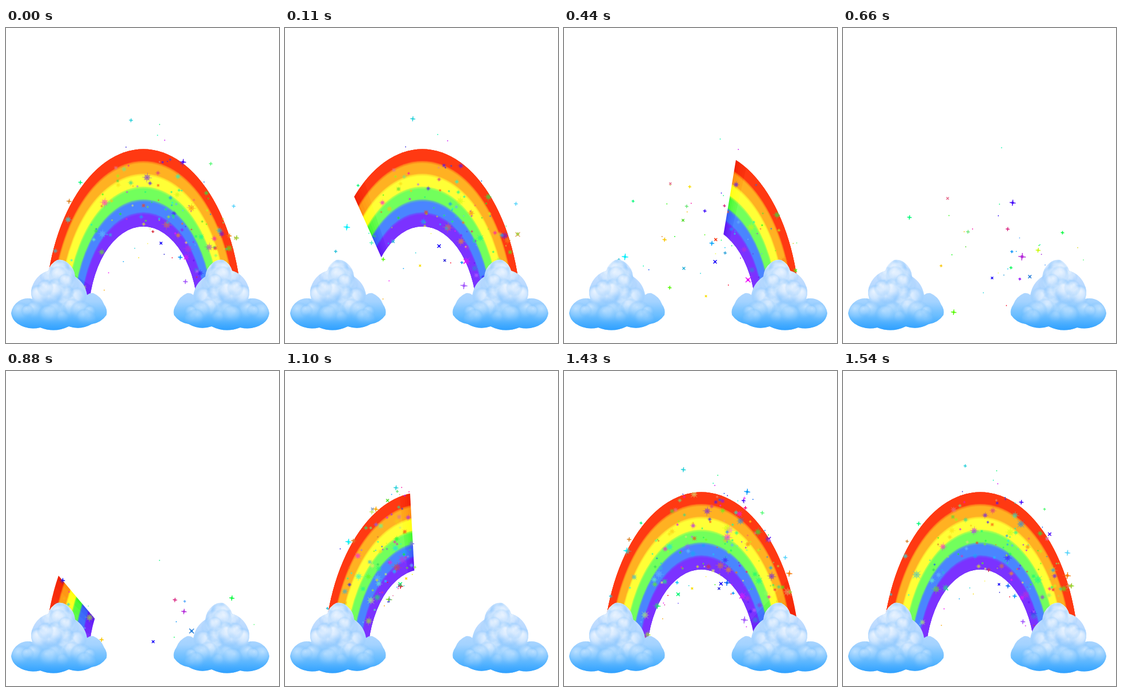
An HTML page with a canvas that plays this animation: 478x550 px, repeating every 1650 ms.

```html
<!DOCTYPE html>
<html lang="en">
<head>
<meta charset="utf-8">
<title>Rainbow</title>
<style>
  html, body { margin: 0; width: 100%; height: 100%; overflow: hidden; background: #fff; }
  canvas { display: block; }
</style>
</head>
<body>
<canvas id="stage" width="478" height="550"></canvas>
<script>
const W = 478, H = 550, STEP = 110, STEPS = 15;
const ctx = document.getElementById('stage').getContext('2d');

let seed = 77;
function random() {
  seed = (seed * 1664525 + 1013904223) >>> 0;
  return seed / 4294967296;
}
const between = (a, b) => a + (b - a) * random();
const clamp = (v, limit) => Math.max(-limit, Math.min(limit, v));

function layer(paint) {
  const canvas = document.createElement('canvas');
  canvas.width = W;
  canvas.height = H;
  paint(canvas.getContext('2d'));
  return canvas;
}

// ---- Rainbow: u runs from the outer edge (0) to the inner edge (1) ----
const CX = 240.5, DEPTH = 135, GROUND = 505;
const arc = u => ({ cy: 511 - 5 * u, a: 173 - 77 * u, b: 299.5 - 140 * u });

function arcPoint(n, u) {
  const { cy, a, b } = arc(u);
  n = clamp(n, 0.994);
  return [CX + a * n, cy - b * Math.sqrt(1 - n * n)];
}

function rainbow(colors) {
  return layer(c => {
    const disc = (top, alpha) => {
      const { cy, a, b } = arc(top / DEPTH);
      c.globalAlpha = alpha;
      c.beginPath();
      c.ellipse(CX, cy, a, b, 0, 0, 7);
      c.fill();
    };
    c.rect(0, 0, W, GROUND);
    c.clip();
    colors.forEach((color, i) => {
      const top = i * 22.4;
      c.fillStyle = color;
      if (i) for (let o = -2; o < 2; o++) disc(top + o, 0.35);
      disc(top + (i ? 2 : 0), 1);
    });
    c.globalCompositeOperation = 'destination-out';
    disc(DEPTH, 1);
  });
}

const bright = rainbow(['#ff3912', '#ffb122', '#ffff36', '#72ff5c', '#4a85ff', '#7b32ff']);
const deep = rainbow(['#f02004', '#ff8c10', '#ffff10', '#3cf52c', '#3555f5', '#5a14f2']);

// Shows the part of the arc on one side of a cut (side 1: left, -1: right).
function drawPart(image, x, side, alpha) {
  const n = (x - CX) / 173;
  const [ox, oy] = arcPoint(n, 0), [ix, iy] = arcPoint(n * (1.18 - 0.2 * n * n), 1);
  ctx.save();
  ctx.translate(ox, oy);
  ctx.rotate(Math.atan2(iy - oy, ix - ox));
  ctx.beginPath();
  ctx.rect(-900, 0, 1800, 900 * side);
  ctx.clip();
  ctx.setTransform(1, 0, 0, 1, 0, 0);
  ctx.globalAlpha = alpha;
  ctx.drawImage(image, 0, 0);
  ctx.restore();
}

const headX = t => 92 + 63.5 * (t - 8);
const tailX = t => 61 + 60 * t;

function drawRainbow(k) {
  const growing = k > 6, side = growing ? 1 : -1;
  const x = growing ? headX(k) : tailX(k);
  drawPart(deep, x, side, 1);
  for (let d = 2; d <= 18; d += 4) drawPart(bright, x - d * side, side, d < 18 ? 0.28 : 1);
}

// ---- Clouds: a few corners joined by outward bulges, filled with soft puffs ----
const corners = [
  [9, 498], [22, 477], [46, 473], [48, 446], [74, 424], [90, 405], [108, 410], [121, 434],
  [142, 466], [153, 463], [172, 483], [176, 501], [150, 517], [110, 521], [60, 523], [20, 516]
];

const cloud = layer(c => {
  c.moveTo(...corners[0]);
  corners.forEach(([x, y], i) => {
    const [nx, ny] = corners[(i + 1) % corners.length];
    const dx = nx - x, dy = ny - y;
    c.quadraticCurveTo((x + nx) / 2 + dy * 0.22, (y + ny) / 2 - dx * 0.22, nx, ny);
  });
  c.clip();

  const wash = (top, bottom, ...colors) => {
    const g = c.createLinearGradient(0, top, 0, bottom);
    colors.forEach((color, i) => g.addColorStop(i / (colors.length - 1), color));
    c.fillStyle = g;
    c.fillRect(0, 390, 200, 150);
  };
  wash(403, 525, '#dcebff', '#bddbff', '#9ed1ff', '#6cc0ff');
  for (let i = 0; i < 46; i++) {
    const f = random(), spread = 14 + 68 * f * f;
    const x = 90 + between(-spread, spread), y = 412 + 98 * f, r = between(11, 23);
    const puff = c.createRadialGradient(x - r * 0.2, y - r * 0.4, 0, x, y, r);
    puff.addColorStop(0, 'rgba(242,248,255,.72)');
    puff.addColorStop(0.5, 'rgba(222,237,255,.42)');
    puff.addColorStop(0.85, 'rgba(140,198,252,.2)');
    puff.addColorStop(1, 'rgba(140,198,252,0)');
    c.fillStyle = puff;
    c.fillRect(x - r, y - r, 2 * r, 2 * r);
  }
  wash(478, 526, 'rgba(60,170,255,0)', 'rgba(60,170,255,.4)', 'rgba(40,156,255,.85)');
});

function drawClouds() {
  ctx.drawImage(cloud, 0, 0);
  ctx.save();
  ctx.translate(470, 0);
  ctx.scale(-1, 1);
  ctx.drawImage(cloud, 0, 0);
  ctx.restore();
}

// ---- Sparkles: shed by the growing end, each flies a parabola with apex (x, y) at time t ----
const sparkles = Array.from({ length: 260 }, () => {
  const born = between(7.4, 13), rise = 9 * random() ** 3 - 1, vx = between(-3, 7);
  const [x, y] = arcPoint((headX(born) - CX) / 173, between(-0.12, 1.15));
  return {
    t: born + rise, x: x + vx * rise, y: y - rise * rise, vx, born,
    dies: born + 2 + 13 * random() ** 2.3,
    hue: between(0, 360), size: 1 + 5 * random() ** 2
  };
});

function cross(x, y, r, turn) {
  ctx.beginPath();
  for (let i = 0; i < 2; i++) {
    const a = turn + i * Math.PI / 2, dx = r * Math.cos(a), dy = r * Math.sin(a);
    ctx.moveTo(x - dx, y - dy);
    ctx.lineTo(x + dx, y + dy);
  }
  ctx.stroke();
}

// Soft flakes over the rainbow, crisp little stars on the white around it.
function drawSparkle(s, time, i) {
  const age = time - s.t, x = s.x + s.vx * age, y = s.y + age * age;
  if (y > GROUND) return;
  const r = s.size * (0.8 + 0.2 * Math.sin(i * 7 + time * 2));
  const turn = i % 3 ? 0.1 : 0.8;
  ctx.strokeStyle = ctx.fillStyle = `hsl(${s.hue},${i % 4 ? 95 : 70}%,${i % 5 ? 52 : 68}%)`;

  ctx.globalCompositeOperation = 'source-atop';
  ctx.globalAlpha = 0.35;
  ctx.beginPath();
  ctx.arc(x, y, r, 0, 7);
  ctx.fill();
  ctx.lineWidth = 1.2;
  cross(x, y, r * 1.7, turn);
  cross(x, y, r * 1.4, turn + Math.PI / 4);

  ctx.globalCompositeOperation = 'destination-over';
  ctx.globalAlpha = 1;
  ctx.lineWidth = 1.5;
  if (r > 2) cross(x, y, r * 1.1, turn);
  const core = Math.max(1.6, r * 0.8);
  ctx.fillRect(x - core / 2, y - core / 2, core, core);
}

function draw(k) {
  ctx.clearRect(0, 0, W, H);
  drawRainbow(k);
  sparkles.forEach((s, i) => {
    for (const time of [k, k + STEPS])
      if (time >= s.born && time < s.dies) drawSparkle(s, time, i);
  });
  ctx.globalCompositeOperation = 'source-over';
  ctx.globalAlpha = 1;
  drawClouds();
}

function tick() {
  draw(Math.floor(performance.now() / STEP) % STEPS);
  requestAnimationFrame(tick);
}
tick();
</script>
</body>
</html>
```
